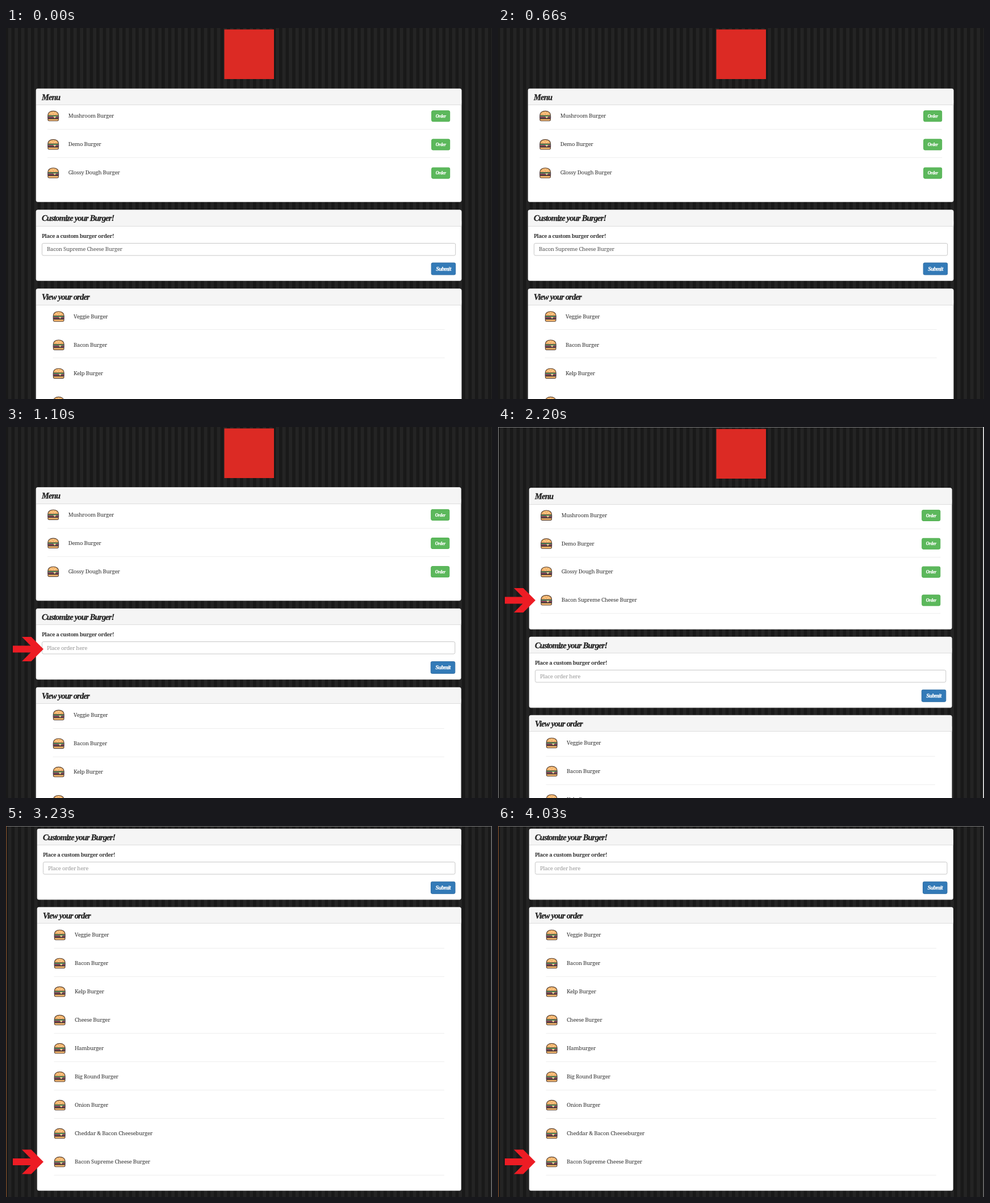
These frames come from a looping animation (856x654 px, 4560 ms). An HTML page:

```html
<!DOCTYPE html>
<html lang="en">
<head>
<meta charset="utf-8">
<title>Burger menu</title>
<style>
html, body { margin: 0; width: 100%; height: 100%; overflow: hidden; background: #1c1c1c; }
svg { display: block; position: absolute; left: 0; top: 0; }
text { font: 9.6px "Noto Serif", "DejaVu Serif", serif; letter-spacing: -.27px; fill: #333; }
.title, .order, .submit { font-family: "Liberation Serif", Times, serif; font-weight: 700; font-style: italic; }
.title { font-size: 14.5px; letter-spacing: -.8px; fill: #222; stroke: #222; stroke-width: .3px; }
.label { font-size: 9.4px; font-weight: 600; letter-spacing: -.4px; }
.typed { fill: #555; }
.hint { fill: #999; }
.order, .submit { fill: #fff; stroke: #fff; stroke-width: .25px; text-anchor: middle; }
.order { font-size: 8px; letter-spacing: -.3px; }
.submit { font-size: 10px; letter-spacing: -.5px; }
.scene { visibility: hidden; animation: 4560ms step-end infinite; }
#s0 { animation-name: typed; }
#s1 { animation-name: cleared; }
#s2 { animation-name: added; }
#s3 { animation-name: scrolled; }
@keyframes typed { 0% { visibility: visible } 24.1228%, 100% { visibility: hidden } }
@keyframes cleared { 0% { visibility: hidden } 24.1228% { visibility: visible } 48.2456%, 100% { visibility: hidden } }
@keyframes added { 0% { visibility: hidden } 48.2456% { visibility: visible } 70.8333%, 100% { visibility: hidden } }
@keyframes scrolled { 0% { visibility: hidden } 70.8333%, 100% { visibility: visible } }
</style>
</head>
<body>
<svg id="stage" width="856" height="654" viewBox="0 0 856 654">
  <defs>
    <pattern id="stripes" x="9.5" width="11.5" height="16" patternUnits="userSpaceOnUse">
      <rect width="11.5" height="16" fill="#191919"/>
      <rect x="5.75" width="5.75" height="16" fill="#242424"/>
    </pattern>
    <g id="burger">
      <path d="M1.2 8.6C1 3.4 5 .8 10.5 .8S20 3.4 19.8 8.6Z" fill="#f4b56c" stroke="#5a4436" stroke-width="1.1"/>
      <path d="M6 4.4h1.4M9.8 2.9h1.4M13.6 4.4h1.4M8 6.4h1.4M12 6.2h1.4" stroke="#fff0d0" stroke-width=".9"/>
      <rect x=".5" y="8.3" width="20" height="6.2" rx="1" fill="#4a3540"/>
      <rect x="1.4" y="8.9" width="18.2" height="1.4" fill="#4f9f5c"/>
      <rect x="1.4" y="10.9" width="18.2" height="1.3" fill="#b0506a"/>
      <path d="M10.6 10.4h5l-2.5 3.2Z" fill="#f6e3a0"/>
      <path d="M1.2 14.5H19.8V16q0 2.2-2.4 2.2H3.6q-2.4 0-2.4-2.2Z" fill="#f4b56c" stroke="#5a4436" stroke-width="1.1"/>
    </g>
    <path id="arrow" d="M12-6H43.5L28-21.5H44.5L66 0 44.5 21.5H28L43.5 6H12Z" fill="#ed1c24"/>
  </defs>
  <rect width="856" height="654" fill="url(#stripes)"/>
</svg>
<script>
const custom = 'Bacon Supreme Cheese Burger';
const menu = ['Mushroom Burger', 'Demo Burger', 'Glossy Dough Burger', custom];
const orders = ['Veggie Burger', 'Bacon Burger', 'Kelp Burger', 'Cheese Burger', 'Hamburger',
  'Big Round Burger', 'Onion Burger', 'Cheddar &amp; Bacon Cheeseburger', custom];

const scenes = [
  { left: 53, right: 802.2, logo: 2.5, menu: 107, count: 3, form: 320.7, view: 459.7, typed: custom },
  { left: 53, right: 801.3, logo: 2.5, menu: 106.6, count: 3, form: 320.2, view: 459, arrow: 391.5 },
  { left: 55, right: 799.3, logo: 3.5, menu: 107.6, count: 4, form: 370, view: 508.2, arrow: 305.5,
    edges: ['#8a8a8a', '#fff'] },
  { left: 55, right: 801.5, form: 5, view: 143.2, arrow: 592, edges: ['#94582f', '#777'] }
];

const rect = (x, y, w, h, fill, extra = '') =>
  `<rect x="${x}" y="${y}" width="${w}" height="${h}" fill="${fill}" ${extra}/>`;
const text = (x, y, str, cls = '') => `<text x="${x}" y="${y}" class="${cls}">${str}</text>`;
const rule = (x1, x2, y, color = '#eee') => rect(x1, Math.round(y - .5), x2 - x1, 1, color);
const icon = (x, y) => `<use href="#burger" x="${x}" y="${y}"/>`;
const button = (x, y, w, h, fill, line, cls, str, base) =>
  rect(x + .5, y + .5, w - 1, h - 1, fill, `stroke="${line}" rx="2.2"`) + text(x + w / 2, y + base, str, cls);

// Row spacing follows the page zoom.
const pitch = s => (s.right - s.left) * .067;

function panel({ left, right }, top, height, title) {
  const w = right - left;
  return rect(left, top, w, height, '#fff', 'rx="3" stroke="#ddd" stroke-width=".6"') +
    rect(left, top, w, 28, '#f5f5f5', 'rx="3"') +
    rect(left, top + 20, w, 8.5, '#f5f5f5') +
    rule(left, right, top + 28.5, '#ddd') +
    text(left + 10, top + 19.5, title, 'title');
}

function menuPanel(s) {
  const { left, right, menu: top, count } = s;
  let out = panel(s, top, count > 3 ? 249 : 199.5, 'Menu');
  for (let i = 0; i < count; i++) {
    const y = top + 47.6 + i * pitch(s);
    out += icon(left + 19.7, y - 9) + text(left + 56.7, y + 3.5, menu[i]) +
      button(right - 53, y - 9.3, 33, 20, '#5cb85c', '#4cae4c', 'order', 'Order', 12.6);
    if (i !== 2) out += rule(left + 20, right - 20, y + 24);
  }
  return out;
}

function formPanel(s) {
  const { left, right, form: top, typed } = s;
  return panel(s, top, 124.8, 'Customize your Burger!') +
    text(left + 10, top + 48.8, 'Place a custom burger order!', 'label') +
    rect(left + 10.5, Math.round(top + 58) + .5, right - left - 21, 21.5, '#fff', 'stroke="#c8c8c8" rx="2.5"') +
    text(left + 19, top + 72.5, typed || 'Place order here', typed ? 'typed' : 'hint') +
    button(right - 53.5, top + 92.8, 43.5, 22, '#337ab7', '#2e6da4', 'submit', 'Submit', 14.2);
}

function viewPanel(s) {
  const { left, right, view: top } = s;
  let out = panel(s, top, 499.5, 'View your order');
  orders.forEach((name, i) => {
    const y = top + 48.3 + i * pitch(s);
    out += icon(left + 29.2, y - 9) + text(left + 66, y + 3.5, name);
    if (i !== 2 && i !== 7) out += rule(left + 29.5, right - 29.5, y + 23.7);
  });
  return out;
}

function scene(s, i) {
  let out = '';
  if (s.edges) {
    out += rect(0, 0, 856, 1, '#777') + rect(0, 0, 1, 654, s.edges[0]) + rect(854.5, 0, 1.5, 654, s.edges[1]);
  }
  if (s.menu) out += rect(384.5, s.logo, 87.5, 87.5, '#dc2a24') + menuPanel(s);
  out += formPanel(s) + viewPanel(s);
  if (s.arrow) out += `<use href="#arrow" y="${s.arrow}"/>`;
  return `<g class="scene" id="s${i}">${out}</g>`;
}

document.getElementById('stage').insertAdjacentHTML('beforeend', scenes.map(scene).join(''));
</script>
</body>
</html>
```
